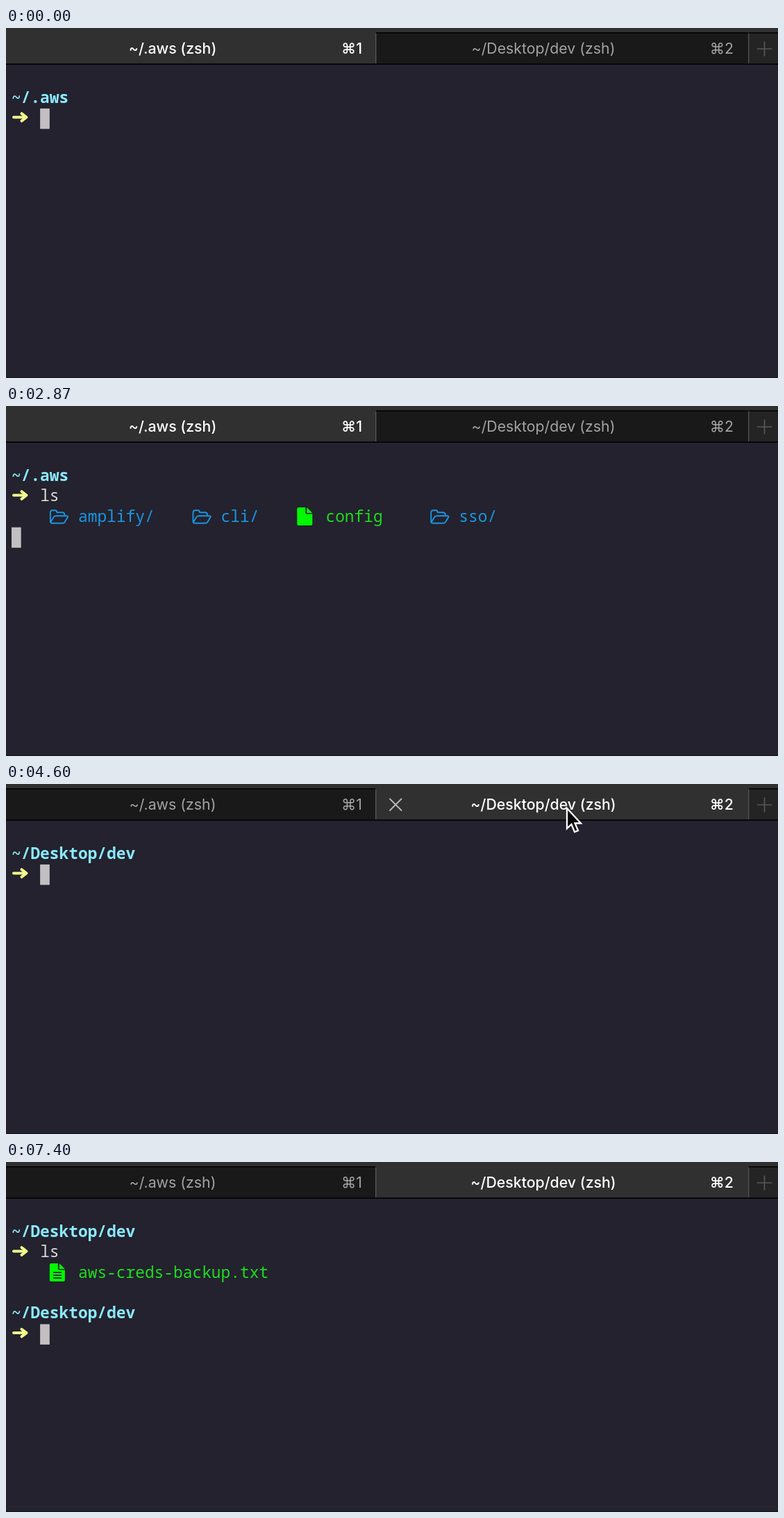
These frames come from a looping animation (1112 by 504 pixels, 8 s). An HTML page:

```html
<!DOCTYPE html>
<html lang="en">
<head>
<meta charset="utf-8">
<title>Terminal</title>
<style>
  html, body { margin: 0; width: 100%; height: 100%; overflow: hidden; background: #23222e; }
  svg { display: block; width: 1112px; height: 504px; }
  text { white-space: pre; }
  .mono { font: 22.85px "Noto Sans Mono", "DejaVu Sans Mono", monospace; }
  .path { font-weight: 700; fill: #8be9fd; }
  .cmd { fill: #dcdcd8; }
  .dir { fill: #1b95e0; }
  .file { fill: #1fdc1f; }
  .tab { font: 21.3px Inter, Roboto, sans-serif; fill: #a3a3a3; }
  .tab.active { font-weight: 500; fill: #fff; }
  .title { text-anchor: middle; }
  .key { text-anchor: end; }
</style>
</head>
<body>
<svg id="stage" viewBox="0 0 1112 504"></svg>
<script>
const LOOP = 8000, TICK = 200 / 3, SWITCH = 4600;
const CELL = 13.71, ROW = 29.4, LEFT = 8, TOP = 86.5;
const stage = document.getElementById('stage');

const colX = c => LEFT + c * CELL;
const rowY = r => TOP + r * ROW;
const rect = (x, y, w, h, fill) =>
  `<rect x="${x}" y="${y}" width="${w}" height="${h}" fill="${fill}"/>`;
const stroke = (d, color, width) =>
  `<path d="${d}" fill="none" stroke="${color}" stroke-width="${width}" stroke-linecap="round" stroke-linejoin="round"/>`;
const at = (x, y, body) => `<g transform="translate(${x} ${y})">${body}</g>`;
const mono = (col, row, kind, str) =>
  `<text class="mono ${kind}" x="${colX(col)}" y="${rowY(row) + 21.3}">${str}</text>`;
const cursor = (col, row) => rect(colX(col), rowY(row), 13.7, 29.4, '#c1bfc1');

// Parts that are visible only from one time to another
const parts = [];
function show(from, to, body) {
  const el = document.createElementNS('http://www.w3.org/2000/svg', 'g');
  el.innerHTML = body;
  stage.append(el);
  parts.push({ el, from, to });
}

const prompt = (row, path) => mono(0, row, 'path', path) + at(LEFT, rowY(row + 1) + 12.6,
  stroke('M3 0H20', '#f1fa8c', 4) + stroke('M14.5-5.3 21.5 0 14.5 5.3', '#f1fa8c', 4));
const folder = (col, name) => at(colX(col), rowY(2) + 4, stroke(
  'M1 17V4Q1 1 4 1H8Q10.500 1 10.500 4H18Q21.500 4 21.500 7V9' +
  'M1.500 18 6 10.500Q7 9 9 9H24.500Q27 9 26 11L22 17.500Q21 19.500 18.500 19.500H3.500Q1 19.500 1 17',
  '#1b95e0', 1.9)) + mono(col + 3, 2, 'dir', name);
const file = (col, name, lines = '') => at(colX(col), rowY(2) + .8,
  '<path fill="#00f800" d="M0 2Q0 0 2 0H12V7.500Q12 9.500 14 9.500H22V24Q22 26 20 26H2Q0 26 0 24ZM14 0 22 7.800H14Z"/>' +
  stroke(lines, '#23222e', 1.8)) + mono(col + 3, 2, 'file', name);

// Window chrome
show(0, LOOP, rect(0, 0, 1112, 504, '#23222e') + rect(0, 502.8, 1112, 1.2, '#181720') +
  rect(0, 0, 1112, 52, '#303030') + rect(1070, 6, 42, 46, '#242424') + rect(1070, 6, 42, 2, '#0a0a0a'));

const shade = (x, w, fill) => rect(x, 6, w, 46, fill) + rect(x, 6, w, 2, '#080808');
show(0, SWITCH, shade(533, 536, '#191919'));
show(SWITCH, LOOP, shade(0, 532, '#191919'));
show(4400, SWITCH, shade(533, 536, '#262626'));
show(0, LOOP, rect(532, 8, 1.4, 43, '#555') + rect(1069, 8, 1.4, 43, '#505050') +
  rect(0, 51, 1112, 2, '#070709') + stroke('M1082.500 30H1102.500M1092.500 20V40', '#575757', 1.7));
show(4400, 5000, stroke('M553 21.500 569.500 38M569.500 21.500 553 38', '#b8b8b8', 1.9));

function title(from, to, x, str, active) {
  show(from, to, `<text class="tab title ${active ? 'active' : ''}" x="${x}" y="37">${str}</text>`);
}
function key(from, to, x, n, active) {
  show(from, to, `<text class="tab key ${active ? 'active' : ''}" x="${x}" y="37">⌘${n}</text>`);
}
const HOME = '~/.aws', DEV = '~/Desktop/dev';
title(0, 2270, 240, HOME + ' (zsh)', true);
title(2270, 2800, 240, 'ls (zsh)', true);
title(2800, 3530, 240, HOME + ' (zsh)', true);
title(3530, 4130, 240, HOME + ' (docker)', true);
title(4130, SWITCH, 240, HOME + ' (zsh)', true);
title(SWITCH, LOOP, 240, HOME + ' (zsh)', false);
title(0, SWITCH, 774, DEV + ' (zsh)', false);
title(SWITCH, 6400, 774, DEV + ' (zsh)', true);
title(6400, 6670, 774, 'ls (zsh)', true);
title(6670, 7400, 774, DEV + ' (grep)', true);
title(7400, LOOP, 774, DEV + ' (zsh)', true);
for (const [x, n] of [[513, 1], [1048, 2]]) {
  key(0, SWITCH, x, n, n === 1);
  key(SWITCH, LOOP, x, n, n === 2);
}

// One shell session: type "ls", run it, list files, prompt again
function session(path, listing, { start, l, s, run, list, again, end }) {
  show(start, end, prompt(0, path));
  show(l, s, mono(3, 1, 'cmd', 'l'));
  show(s, end, mono(3, 1, 'cmd', 'ls'));
  show(list, end, listing);
  show(again, end, prompt(4, path));
  const stops = [[start, 3, 1], [l, 4, 1], [s, 5, 1], [run, 0, 2], [list, 0, 3], [again, 3, 5], [end]];
  stops.slice(0, -1).forEach(([t, col, row], i) => show(t, stops[i + 1][0], cursor(col, row)));
}
session(HOME, folder(4, 'amplify/') + folder(19, 'cli/') + file(30, 'config') + folder(44, 'sso/'),
  { start: 0, l: 1470, s: 2070, run: 2270, list: 2800, again: 3530, end: SWITCH });
session(DEV, file(4, 'aws-creds-backup.txt', 'M6 13H16.500M6 17H16.500M6 21H16.500'),
  { start: SWITCH, l: 5930, s: 6070, run: 6400, list: 6670, again: 6870, end: LOOP });

// Mouse pointer
const beamPath = 'M-6.500-15Q0-15 0-10Q0-15 6.500-15M0-10V10M-6.500 15Q0 15 0 10Q0 15 6.500 15M-2.500 1H2.500';
show(3530, 5930, stroke(beamPath, '#fff', 5) + stroke(beamPath, '#15151c', 1.7));
const beam = parts[parts.length - 1].el;
show(3530, 5930, '<path d="M0 0V29L6.500 23 11 34 16 32 11.500 21.500H20Z" fill="#050505" stroke="#fff" stroke-width="2.300"/>');
const arrow = parts[parts.length - 1].el;

const route = [[3530, 1104, 346], [3600, 1010, 240], [3670, 920, 164], [3730, 887, 138.5],
  [4000, 880, 128], [4200, 846, 80], [4400, 812, 40], [4470, 807, 35], [4530, 808, 35],
  [4870, 808, 35], [4930, 800, 47], [5000, 778, 110], [5070, 742, 215], [5130, 720, 280], [5200, 713, 297.5]];

function pointer(t) {
  const i = route.findIndex(p => p[0] > t);
  if (i < 0) return route[route.length - 1].slice(1);
  if (i === 0) return route[0].slice(1);
  const [a, b] = [route[i - 1], route[i]];
  const k = a[0] === 3730 ? 0 : (t - a[0]) / (b[0] - a[0]);
  return [a[1] + (b[1] - a[1]) * k, a[2] + (b[2] - a[2]) * k];
}

function draw(t) {
  for (const { el, from, to } of parts) el.style.display = t >= from && t < to ? '' : 'none';
  const tick = Math.round(Math.floor((t + 5) / TICK) * TICK / 10) * 10;
  const [x, y] = pointer(tick);
  const onTabs = y < 52;
  (onTabs ? beam : arrow).style.display = 'none';
  for (const el of [beam, arrow]) el.setAttribute('transform', `translate(${x} ${y})`);
}

const begin = performance.now();
function frame() {
  draw((performance.now() - begin) % LOOP);
  requestAnimationFrame(frame);
}
frame();
</script>
</body>
</html>
```
